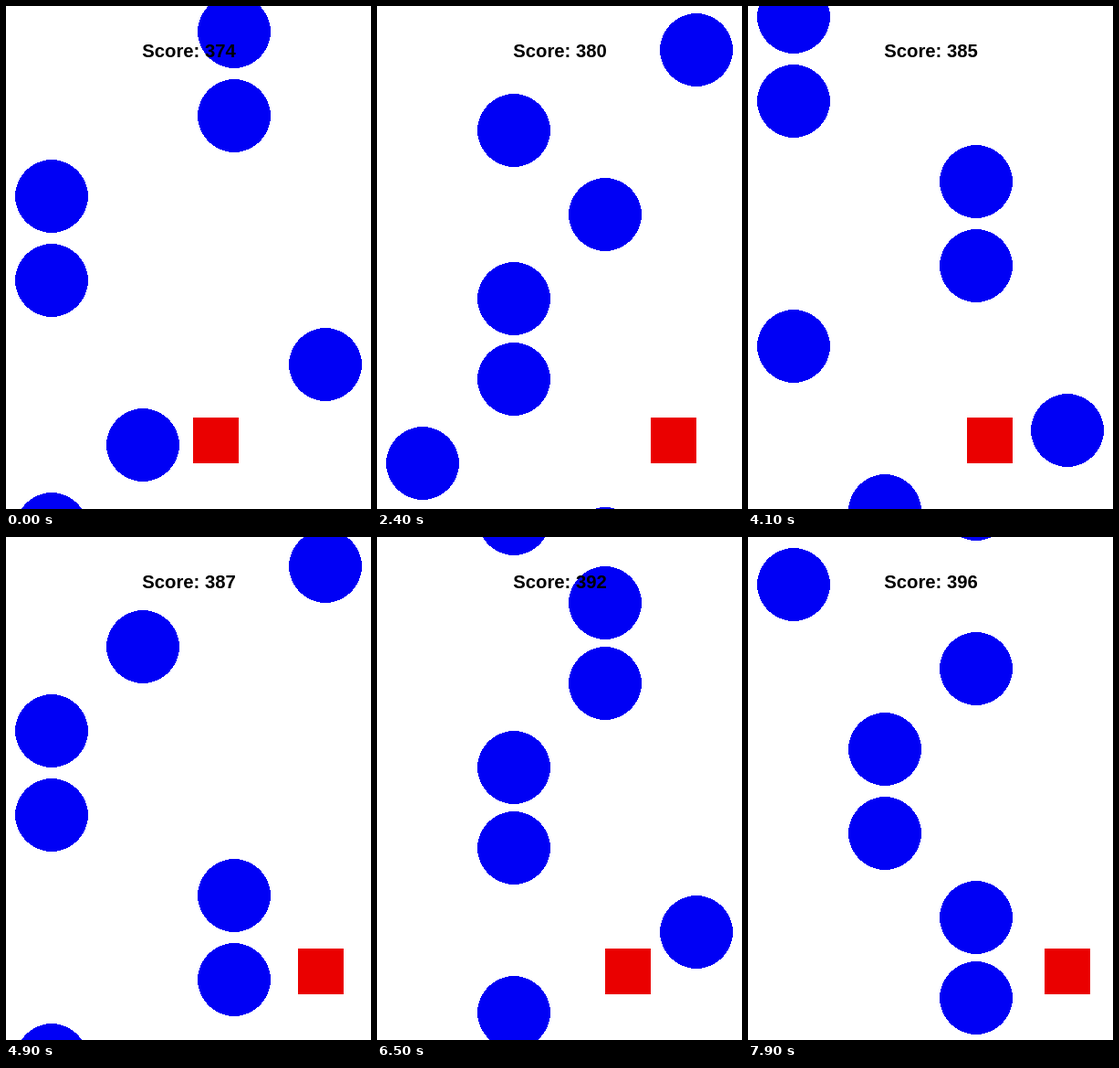
Animation, 400 px wide and 550 px high, one loop 8000 ms. Source, as an HTML page with a canvas:

```html
<!DOCTYPE html>
<html lang="en">
<head>
<meta charset="utf-8">
<title>Dodge</title>
<style>
html, body { margin: 0; width: 100%; height: 100%; overflow: hidden; background: #fff; }
canvas { display: block; }
</style>
</head>
<body>
<canvas id="stage" width="400" height="550"></canvas>
<script>
const W = 400, H = 550, LOOP = 8000, STEP = 100;
const SPEED = 4, RADIUS = 40, SIZE = 50, PLAYER_Y = 450, START_SCORE = 374;
const BLUE = '#0000f5', RED = '#ea0000';
const ctx = document.getElementById('stage').getContext('2d');

// Lane of each ball, in order of arrival
const LANES = '01300220112130220013112211202';

// Key points: [time in ms, value]
const TICKS = [[0, 0], [1300, 72], [4100, 244], [5600, 338], [7900, 480]];
const PLAYER = [
  [0, 205], [1300, 280], [1600, 325], [2400, 300], [3300, 345], [4100, 240],
  [4400, 240], [5100, 350], [5600, 315], [6500, 250], [7000, 240], [7700, 325]
];

// Linear between key points, holding the last value
function track(keys, t) {
  const i = keys.findIndex(([time]) => time > t);
  if (i < 0) return keys[keys.length - 1][1];
  const [t0, a] = keys[i - 1], [t1, b] = keys[i];
  return a + (b - a) * (t - t0) / (t1 - t0);
}

// Hard-edged disc with midpoint rounding, in mirrored rows
function disc(cx, cy) {
  const r2 = RADIUS ** 2;
  for (let d = 1; d <= RADIUS; d++) {
    const half = d < RADIUS * Math.SQRT1_2
      ? Math.round(Math.sqrt(r2 - d * d))
      : Math.floor(Math.sqrt(r2 - (d - 0.5) ** 2));
    ctx.fillRect(cx - half, cy - d, half * 2, 1);
    ctx.fillRect(cx - half, cy + d - 1, half * 2, 1);
  }
}

// A new ball every 158/7 ticks on average
function ballY(k, now) {
  const spawn = Math.floor(158 * k / 7 + 0.78);
  return 572 + SPEED * (now - spawn);
}

function draw(t) {
  const now = Math.round(track(TICKS, t));
  let score = START_SCORE;

  ctx.fillStyle = '#fff';
  ctx.fillRect(0, 0, W, H);

  ctx.fillStyle = BLUE;
  for (let k = 0; k < LANES.length; k++) {
    const y = ballY(k, now);
    if (y - RADIUS > H) score++;
    else if (y + RADIUS > 0) disc(50 + 100 * LANES[k], y);
  }

  ctx.fillStyle = RED;
  ctx.fillRect(5 * Math.round(track(PLAYER, t) / 5), PLAYER_Y, SIZE, SIZE);

  ctx.fillStyle = '#000';
  ctx.font = 'bold 20.3px "Liberation Sans", Arial, sans-serif';
  ctx.textAlign = 'center';
  ctx.fillText('Score: ' + score, 200.5, 56);
}

const start = performance.now();
function loop() {
  const t = (performance.now() - start) % LOOP;
  draw(Math.floor(t / STEP) * STEP);
  requestAnimationFrame(loop);
}
loop();
</script>
</body>
</html>
```
